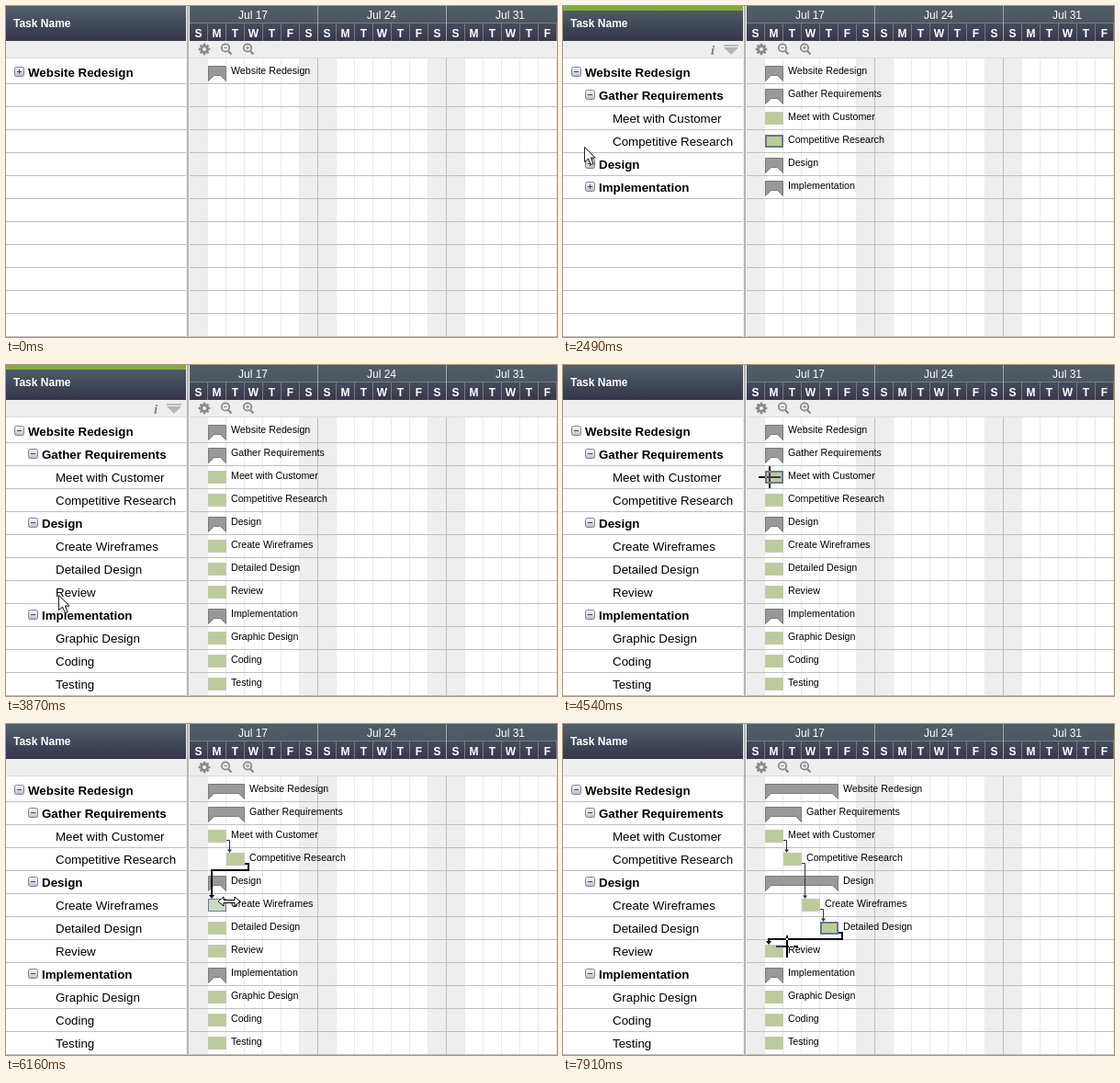
Animation, 600 px wide and 360 px high, one loop 8 s. Source, as an HTML page with a canvas:

```html
<!DOCTYPE html>
<html lang="en">
<head>
<meta charset="utf-8">
<title>Gantt chart</title>
<style>
html, body { margin: 0; width: 100%; height: 100%; overflow: hidden; background: #fff; }
canvas { display: block; width: 600px; height: 360px; }
</style>
</head>
<body>
<canvas id="stage"></canvas>
<script>
const W = 600, H = 360, LOOP = 8000, DAY = 20, LEFT = 200, ROW = 25, STEP = 60;
const SANS = '"Liberation Sans", Arial, sans-serif';
const canvas = document.getElementById('stage');
const ctx = canvas.getContext('2d');
const dpr = window.devicePixelRatio || 1;
canvas.width = W * dpr;
canvas.height = H * dpr;

// Tasks start on day 1 and may move to a later day; groups open after the pointer visits them.
const task = (name, day = 1, moved = Infinity) => ({ name, day, moved });
const group = (name, visit, open, kids) => ({ name, visit, open, kids });
const meet = task('Meet with Customer');
const research = task('Competitive Research', 2, 4980);
const wires = task('Create Wireframes', 3, 6220);
const detail = task('Detailed Design', 4, 7030);
const review = task('Review');
const gather = group('Gather Requirements', [1870, 2110], 2310, [meet, research]);
const design = group('Design', [2310, 2670], 2930, [wires, detail, review]);
const build = group('Implementation', [2930, 3410], 3610, ['Graphic Design', 'Coding', 'Testing'].map(s => task(s)));
const tree = group('Website Redesign', [920, 1280], 1740, [gather, design, build]);

// Each drag grabs one task and drops on the next, making a link.
const drags = [
  { from: meet, to: research, reach: [3810, 4600], pull: [4660, 4780], dropX: 233 },
  { from: research, to: wires, reach: [5180, 5420], pull: [5480, 5840], dropX: 233 },
  { from: wires, to: detail, reach: [6100, 6460], pull: [6520, 6830], dropX: 244 },
  { from: detail, to: review, reach: [7230, 7530], pull: [7730, 7910], dropX: 244 }
];
const release = d => d.pull[1] + 200;

function listRows(t) {
  const rows = [];
  const visit = (node, level) => {
    rows.push({ node, level, y: 72 + ROW * rows.length });
    if (node.kids && t >= node.open) node.kids.forEach(k => visit(k, level + 1));
  };
  visit(tree, 0);
  return rows;
}

const startX = (n, t) => LEFT + DAY * (n.kids || t < n.moved ? 1 : n.day);
const endX = (n, t) => n.kids ? Math.max(...n.kids.map(k => endX(k, t))) : startX(n, t) + DAY;

// Pointer moves follow from the rows and bars they lead to.
function planMoves() {
  const moves = [];
  const add = ([start, end], node, goal, bow = 0) => {
    const last = moves[moves.length - 1];
    const row = listRows(end).find(r => r.node === node);
    moves.push({ start, end, bow, a: last ? last.b : [60, 0], b: goal(row, end) });
  };
  [tree, gather, design, build].forEach(g =>
    add(g.visit, g, r => [13 + 15 * r.level, r.y], 5));
  drags.forEach(d => {
    add(d.reach, d.from, (r, t) => [startX(d.from, t) + 7, r.y - 1]);
    add(d.pull, d.to, r => [d.dropX, r.y - 5]);
  });
  return moves;
}
const moves = planMoves();

// The pointer advances in steps and slows towards its goal.
function pointer(t) {
  const m = moves.filter(v => v.start <= t).pop();
  if (!m) return null;
  const stepped = Math.floor((t - m.start) / STEP) * STEP;
  const k = t >= m.end ? 1 : stepped / (m.end - m.start);
  const e = 1 - (1 - k) ** 2;
  const mix = i => m.a[i] + (m.b[i] - m.a[i]) * e;
  return [Math.round(mix(0) - m.bow * Math.sin(Math.PI * k)), Math.round(mix(1))];
}

function rect(x, y, w, h, color) {
  ctx.fillStyle = color;
  ctx.fillRect(x, y, w, h);
}

function text(s, x, y, size, color, weight = '', align = 'left') {
  ctx.font = `${weight} ${size}px ${SANS}`;
  ctx.textAlign = align;
  ctx.fillStyle = color;
  ctx.fillText(s, x, y);
}

function trace(points, close) {
  ctx.beginPath();
  points.forEach(([x, y]) => ctx.lineTo(x, y));
  if (close) ctx.closePath();
}

function shape(points, fill, stroke) {
  trace(points, true);
  ctx.fillStyle = fill;
  ctx.fill();
  if (!stroke) return;
  ctx.strokeStyle = stroke;
  ctx.lineWidth = 1;
  ctx.stroke();
}

function line(points, color, width) {
  trace(points);
  ctx.strokeStyle = color;
  ctx.lineWidth = width;
  ctx.stroke();
}

function ring(x, y, r, color, width) {
  ctx.beginPath();
  ctx.arc(x, y, r, 0, 7);
  ctx.strokeStyle = color;
  ctx.lineWidth = width;
  ctx.stroke();
}

function shade(y0, y1, ...colors) {
  const g = ctx.createLinearGradient(0, y0, 0, y1);
  colors.forEach((c, i) => g.addColorStop(i / (colors.length - 1), c));
  return g;
}

function drawGrid() {
  rect(0, 0, W, H, '#fff');
  for (let d = 0; d < 20; d++) {
    const x = LEFT + d * DAY;
    if (d % 7 === 0 || d % 7 === 6) rect(x, 57, DAY, H, '#eee');
    rect(x + DAY - 1, 57, 1, H, d % 7 === 6 ? '#c0c0c0' : '#ebebeb');
  }
  for (let y = 84; y < H; y += ROW) rect(0, y, W, 1, '#c0c0c0');
}

function drawHeader(hover) {
  rect(0, 0, W, 38, shade(0, 38, '#566067', '#485260', '#3d4353', '#38364b'));
  rect(LEFT, 0, W, 19, shade(0, 19, '#535d64', '#4d5761'));
  rect(LEFT, 19, W, 19, shade(19, 38, '#454d5b', '#38364b'));
  rect(LEFT, 18, W, 1, '#777d85');
  for (let d = 0; d < 20; d++) {
    const x = LEFT + d * DAY;
    const week = d % 7 === 6;
    rect(x + DAY - 1, week ? 0 : 19, 1, week ? 38 : 19, week ? '#a0a3a8' : '#777a84');
    text('SMTWTFS'[d % 7], x + 9.5, 34, 12, '#fff', 'bold', 'center');
  }
  ['Jul 17', 'Jul 24', 'Jul 31'].forEach((s, i) => text(s, 269 + 140 * i, 14, 12, '#fff', '', 'center'));
  if (hover) rect(0, 0, 196, 5, '#84ab3c');
  text('Task Name', 8, 23, 12, '#fff', 'bold');
  rect(0, 38, W, 19, '#eee');
  rect(0, 56, W, 1, '#dcdcdc');
  rect(196, 0, 4, H, '#f0f0f0');
  rect(197, 0, 2, H, '#b4b4b4');
}

function drawTools(hover) {
  const gray = '#8a8a8a';
  ctx.save();
  ctx.translate(216, 47);
  for (let i = 0; i < 8; i++) {
    ctx.rotate(Math.PI / 4);
    rect(-1.3, -6.3, 2.6, 4, gray);
  }
  ring(0, 0, 3.4, gray, 2.6);
  ctx.restore();
  [239, 263].forEach((x, i) => {
    ring(x, 45.5, 4.2, gray, 1.8);
    line([[x + 3, 49], [x + 6.5, 52.5]], gray, 2.4);
    rect(x - 2, 45, 4, 1, gray);
    if (i) rect(x - 0.5, 43.5, 1, 4, gray);
  });
  if (!hover) return;
  ctx.font = 'italic bold 15px "Liberation Serif", serif';
  ctx.textAlign = 'center';
  ctx.fillStyle = '#858585';
  ctx.fillText('i', 163, 53);
  rect(175, 42, 16, 2, '#bdbdbd');
  shape([[175, 45], [191, 45], [183, 53]], '#b5b5b5');
}

function drawExpander(x, y, open) {
  ctx.beginPath();
  ctx.roundRect(x + 0.5, y - 5.5, 10, 10, 2);
  ctx.fillStyle = shade(y - 5, y + 5, '#f4f4f8', '#bcbccb');
  ctx.fill();
  ctx.strokeStyle = '#80808c';
  ctx.lineWidth = 1;
  ctx.stroke();
  rect(x + 3, y - 1, 5, 1, '#44445a');
  if (!open) rect(x + 5, y - 3, 1, 5, '#44445a');
}

function drawSummary(x0, x1, y) {
  const top = y - 6.5, tip = y + 9.5, mid = y + 3.5;
  shape([[x0 + 0.5, top], [x1 - 0.5, top], [x1 - 0.5, tip], [x1 - 6.5, mid], [x0 + 6.5, mid], [x0 + 0.5, tip]],
    '#999', '#7a7a7a');
}

function drawTask(x, y, lit) {
  const soft = lit === 'soft', w = soft ? 1 : 2;
  rect(x, y - 7, DAY, 14, '#c3c5bd');
  rect(x + 1, y - 6, DAY - 2, 12, soft ? '#ccdac6' : '#bdcb9b');
  if (!lit) return;
  ctx.strokeStyle = '#6b778d';
  ctx.lineWidth = w;
  ctx.strokeRect(x + w / 2, y - 7 + w / 2, DAY - w, 14 - w);
}

function drawRow({ node, level, y }, t, lit) {
  const x = 9 + 15 * level, end = endX(node, t);
  if (node.kids) {
    drawExpander(x, y, t >= node.open);
    drawSummary(startX(node, t), end, y);
  } else {
    drawTask(startX(node, t), y, lit);
  }
  text(node.name, x + 15, y + 5, 13.333, '#000', node.kids ? 'bold' : '');
  text(node.name, end + 5, y + 2, 10.667, '#000');
}

function arrowHead(x, y, size, color) {
  shape([[x - size, y - size], [x + size, y - size], [x, y + 1]], color);
}

function drawLink(from, to, t, rowY) {
  const x = endX(from, t), y = rowY(from) + 4.5, tip = rowY(to) - 8;
  line([[x, y], [x + 3.5, y], [x + 3.5, tip]], '#333', 1);
  arrowHead(x + 3.5, tip, 2.5, '#333');
}

function drawDrag(d, t, [px, py], rowY) {
  const x = endX(d.from, t), y = rowY(d.from) + 5, turn = y + 7;
  const snapped = py >= rowY(d.to) - 13;
  if (!snapped && py < turn) return;
  const tx = snapped ? startX(d.to, t) + 4 : px;
  const ty = snapped ? rowY(d.to) - 8 : py;
  line([[x, y], [x + 4, y], [x + 4, turn], [tx, turn], [tx, ty - 1]], '#000', 2);
  arrowHead(tx, ty, 3, '#000');
}

// The cross inverts whatever lies below it.
function drawCross(x, y) {
  ctx.save();
  ctx.globalCompositeOperation = 'difference';
  rect(x - 1, y - 12, 2, 24, '#fff');
  rect(x - 12, y - 1, 11, 2, '#fff');
  rect(x + 1, y - 1, 11, 2, '#fff');
  ctx.restore();
}

function drawResize(x, y) {
  const half = [[-12, 0], [-6, -5], [-6, -1.5], [6, -1.5], [6, -5], [12, 0]];
  const all = half.concat(half.slice(1, 5).reverse().map(([a, b]) => [a, -b]));
  shape(all.map(([a, b]) => [x + a, y + b]), '#fff', '#000');
}

function drawArrow(x, y) {
  const outline = [[0, 0], [0, 16], [4, 12.5], [7, 19], [9.5, 18], [6.8, 11.5], [11.5, 11.5]]
    .map(([a, b]) => [x + a + 0.5, y + b + 0.5]);
  ctx.save();
  ctx.shadowColor = 'rgba(0,0,0,.4)';
  ctx.shadowBlur = 3 * dpr;
  ctx.shadowOffsetX = ctx.shadowOffsetY = dpr;
  shape(outline, '#fff');
  ctx.restore();
  shape(outline, '#fff', '#222');
}

function drawPointer([x, y], t, rows, dragging) {
  if (dragging) return drawCross(x, y);
  const over = rows.find(r => !r.node.kids && Math.abs(r.y - y) <= 8);
  if (over && x >= startX(over.node, t)) {
    const past = x - endX(over.node, t);
    if (past <= -3) return drawCross(x, y);
    if (past <= 6) return drawResize(x, y);
  }
  drawArrow(x, y);
}

function draw(t) {
  const pos = pointer(t), late = pointer(t - STEP);
  const rows = listRows(t);
  const rowY = n => rows.find(r => r.node === n).y;
  const drag = drags.find(d => t >= d.pull[0] && t < d.to.moved);
  const dragging = drag && t < release(drag);
  const hover = pos && pos[0] < 196;
  const lit = r => {
    if (dragging) return r.node === drag.from;
    const on = late && Math.abs(r.y - late[1]) <= 12;
    return on && drag ? 'soft' : on;
  };

  ctx.setTransform(dpr, 0, 0, dpr, 0, 0);
  drawGrid();
  drawHeader(hover);
  drawTools(hover);
  rows.forEach(r => drawRow(r, t, lit(r)));
  drags.forEach(d => { if (t >= d.to.moved) drawLink(d.from, d.to, t, rowY); });
  if (drag) drawDrag(drag, t, pos, rowY);
  if (pos) drawPointer(pos, t, rows, dragging);
}

const begin = performance.now();
function frame() {
  draw((performance.now() - begin) % LOOP);
  requestAnimationFrame(frame);
}
frame();
</script>
</body>
</html>
```
